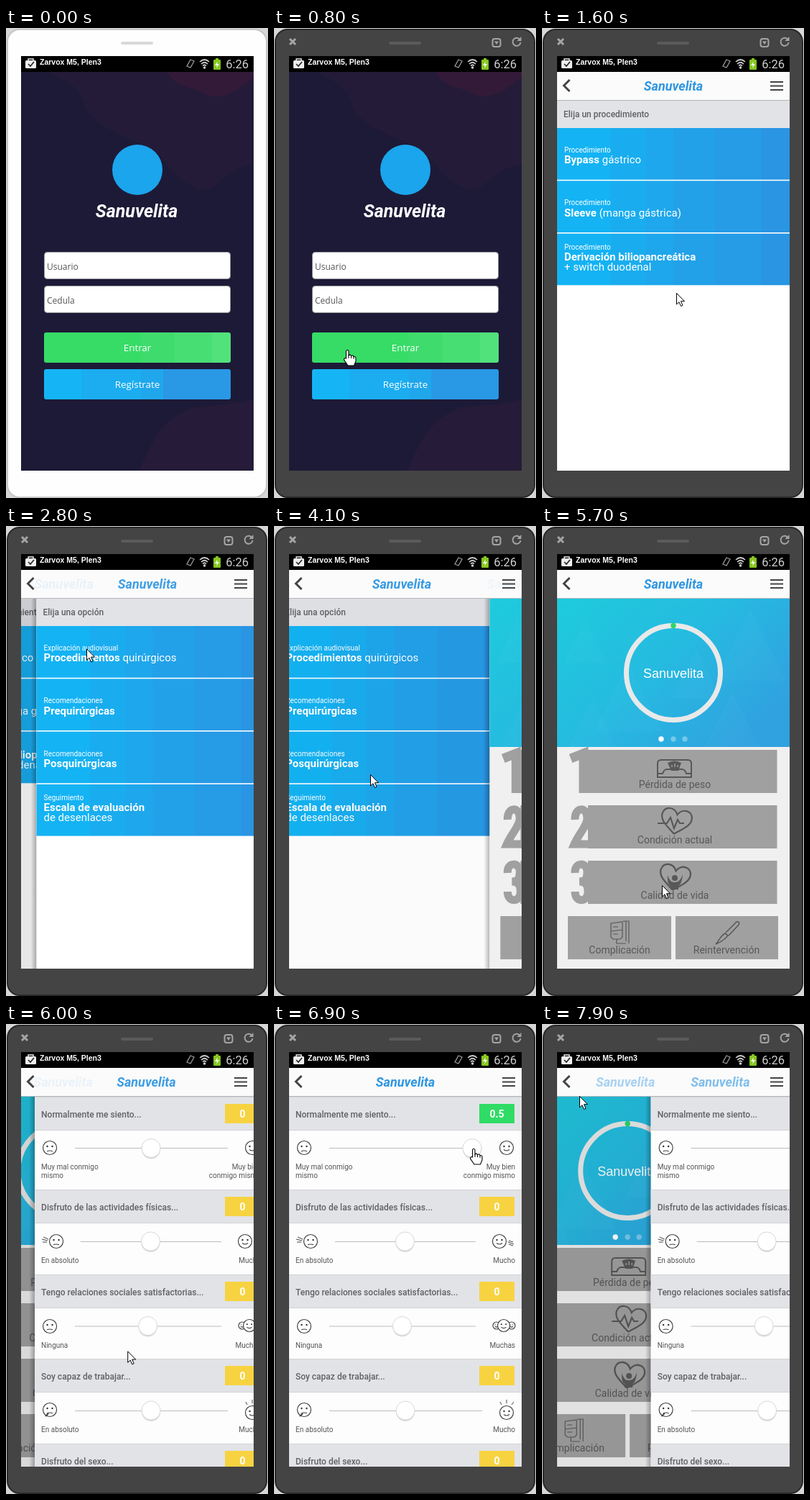
These frames come from a looping animation (365 px wide and 653 px high, 8 s). An HTML page:

```html
<!DOCTYPE html>
<html lang="es">
<head>
<meta charset="utf-8">
<title>Sanuvelita</title>
<style>
  html, body { margin: 0; width: 100%; height: 100%; overflow: hidden; background: #d6d6d6; }
  svg { display: block; width: 365px; height: 653px; }
  text { font-family: Roboto, sans-serif; white-space: pre; }
</style>
</head>
<body>
<svg id="stage" viewBox="0 0 365 653"></svg>
<script>
const LOOP = 8000, WIDTH = 324, BRAND = 'Sanuvelita';

// Drawing helpers
const rect = (x, y, w, h, fill, extra = '') =>
  `<rect x="${x}" y="${y}" width="${w}" height="${h}" fill="${fill}" ${extra}/>`;
const circle = (x, y, r, fill, extra = '') =>
  `<circle cx="${x}" cy="${y}" r="${r}" fill="${fill}" ${extra}/>`;
const text = (x, y, size, fill, content, extra = '') =>
  `<text x="${x}" y="${y}" font-size="${size}" fill="${fill}" ${extra}>${content}</text>`;
const line = (d, color, width = 1, extra = '') =>
  `<path d="${d}" fill="none" stroke="${color}" stroke-width="${width}" ${extra}/>`;
const shape = (d, fill, extra = '') => `<path d="${d}" fill="${fill}" ${extra}/>`;
const group = (id, content, extra = '') => `<g id="${id}" ${extra}>${content}</g>`;
const MIDDLE = 'text-anchor="middle"', END = 'text-anchor="end"', BOLD = 'font-weight="700"';

// Horizontal gradient made of flat bands
const bands = (id, stops) => `<linearGradient id="${id}">` + stops.map(([at, color], i) =>
  `<stop offset="${at}" stop-color="${color}"/>` +
  `<stop offset="${i + 1 < stops.length ? stops[i + 1][0] : 1}" stop-color="${color}"/>`).join('') +
  '</linearGradient>';

const defs = `<defs>
  ${bands('itemBlue', [[0, '#14b3f3'], [.23, '#19adef'], [.38, '#1ea7ec'], [.5, '#22a1e9'], [.68, '#269be6'], [.88, '#2995e3']])}
  ${bands('buttonBlue', [[0, '#15b5f5'], [.2, '#1badf0'], [.52, '#20a6eb'], [.64, '#2998e5']])}
  ${bands('buttonGreen', [[0, '#37dc67'], [.52, '#3fdc6d'], [.7, '#47de74'], [.9, '#51e27c']])}
  <linearGradient id="aqua" x2="1" y2=".65"><stop stop-color="#1ecbdc"/><stop offset=".5" stop-color="#25bbe0"/><stop offset="1" stop-color="#30a2e0"/></linearGradient>
  <linearGradient id="shade"><stop stop-opacity="0"/><stop offset="1" stop-opacity=".28"/></linearGradient>
  <clipPath id="screen"><rect x="21" y="61" width="324" height="554"/></clipPath>
</defs>`;

function loginPage() {
  const field = (y, label) => rect(53.5, y + .5, 259, 37, '#fff', 'rx="4" stroke="#9a9a9f"') +
    text(57, y + 25, 12, '#555', label, 'style="font-family:Open Sans,sans-serif"');
  const button = (y, fill, label) => rect(53, y, 260, 42, `url(#${fill})`, 'rx="3"') +
    text(183, y + 26, 13.4, '#fff', label, MIDDLE + ' style="font-family:Open Sans,sans-serif"');
  return rect(21, 61, WIDTH, 554, '#1d1a37') +
    shape('M60 61C78 72 102 78 108 105C114 130 160 150 188 160C225 176 225 204 260 220C290 240 300 195 345 190V61Z', '#241b38') +
    shape('M225 61C238 85 262 81 276 91C300 103 325 85 345 68V61Z', '#331a39') +
    shape('M185 615C205 575 212 548 256 529C290 522 315 526 345 515V615Z', '#261b38') +
    circle(183, 197, 35, '#1ba5ec') +
    text(182, 263, 25, '#fff', BRAND, `${MIDDLE} ${BOLD} font-style="italic"`) +
    field(311, 'Usuario') + field(358, 'Cedula') +
    button(423, 'buttonGreen', 'Entrar') + button(474, 'buttonBlue', 'Regístrate');
}

function listPage(heading, items) {
  return rect(21, 101, WIDTH, 514, '#fff') + rect(21, 101, WIDTH, 38, '#e2e3e7') +
    text(30, 124, 12, '#5f6165', heading, 'font-weight="500"') +
    items.map(([label, main, rest, second], i) => {
      const y = 139 + i * 73.3, top = y + (second ? 22 : 34);
      return rect(21, y, WIDTH, 71.7, 'url(#itemBlue)') + text(31, top, 10, '#fff', label) +
        text(31, top + 15.3, 15, '#fff', `<tspan font-weight="700">${main}</tspan>${rest}`) +
        (second ? text(31, top + 29, 15, '#fff', second) : '');
    }).join('');
}

function dashboardPage() {
  const ink = '#585858', gray = '#a0a0a0';
  // Each numeral runs into the tile on its right
  const digits = line('M40 323L58 316V371', gray, 13) +
    line('M46 408C45 390 63 389 63 406C63 417 52 426 45 442H69', gray, 11) +
    line('M46 482C45 466 63 467 63 480C63 494 57 494 52 494C60 494 64 498 64 508C64 523 46 524 46 508', gray, 11);
  const tiles = [311, 388, 465].map(y => rect(64, y, 263.500, 60, gray)).join('') +
    rect(36, 542, 144, 60, gray) + rect(186, 542, 143, 60, gray);
  const label = (x, y, s) => text(x, y, 14, ink, s, MIDDLE);
  const heart = (x, y) => `M${x} ${y + 34}C${x - 8} ${y + 27} ${x - 22} ${y + 20} ${x - 21} ${y + 9}C${x - 19} ${y - 3} ${x - 5} ${y - 3} ${x} ${y + 7}C${x + 6} ${y - 4} ${x + 21} ${y - 2} ${x + 21} ${y + 10}C${x + 21} ${y + 20} ${x + 8} ${y + 27} ${x} ${y + 34}`;
  const triangles = [[60, 130, 60], [120, 190, 95], [215, 170, 70], [290, 115, 100], [70, 240, 67], [265, 230, 77]]
    .map(([x, y, s]) => shape(`M${x} ${y}l${s / 2} ${s}h${-s}Z`, '#fff', 'opacity=".02"')).join('');
  return rect(21, 101, WIDTH, 514, '#f0f0f0') + rect(21, 101, WIDTH, 206, 'url(#aqua)') + triangles +
    circle(183, 204, 65.5, 'none', 'stroke="#e9e9e9" stroke-width="7"') + circle(183, 138.5, 3.7, '#2fd566') +
    text(183, 211, 18, '#fff', BRAND, MIDDLE + ' style="font-family:Liberation Sans,sans-serif"') +
    [166, 183, 199].map((x, i) => circle(x, 296, 3.7, '#fff', i ? 'opacity=".35"' : '')).join('') +
    tiles + digits +
    line('M161 349V330Q161 325 166 325H203Q208 325 208 330V349ZM161 344H168Q170 338 174 338H195Q199 338 201 344H208', ink, 2) +
    shape('M175 329Q185 324 194 329L190 340H180Z', ink) + line('M181 335V332M185 335V330M189 335V332', gray, 1.5) +
    label(185, 364, 'Pérdida de peso') +
    line(heart(187, 394), ink, 2.2, 'transform="rotate(10 187 410)"') +
    line('M161 413H174L179 405L184 420L189 408L192 413H198', ink, 2.2) +
    label(185, 441, 'Condición actual') +
    line(heart(185, 472), ink, 2.4, 'transform="rotate(10 185 488)"') +
    circle(185, 489, 4, ink) + shape('M175 485Q178 496 185 495Q192 496 196 484Q195 497 190 500V505H179V500Q174 497 175 485', ink) +
    label(185, 518, 'Calidad de vida') +
    line('M96 552L112 550V571L109 574H99L96 571ZM96 563L112 561M113 549H121V580M117 549V577M104 574V580H117M99 557H106M99 567H106', ink, 1.2) +
    label(108, 594, 'Complicación') +
    line('M242 581C247 576 248 570 255 566L259 569C254 575 249 578 242 581ZM256 565L271 550Q276 549 274 554L260 569', ink, 1.5) +
    label(257, 594, 'Reintervención');
}

function face(x, y, mood, r = 9.5) {
  const s = r / 9.5;
  return circle(x, y, r, '#fff', 'stroke="#444" stroke-width="1.2"') +
    circle(x - 3.5 * s, y - 2 * s, 1.2 * s, '#333') + circle(x + 3.5 * s, y - 2 * s, 1.2 * s, '#333') +
    line(`M${x - 4 * s} ${y + 4 * s - mood}Q${x} ${y + 4 * s + mood} ${x + 4 * s} ${y + 4 * s - mood}`, '#444', 1.1);
}

function formPage() {
  const rows = [
    [101, 172, 'Normalmente me siento...', ['Muy mal conmigo', 'mismo'], ['Muy bien', 'conmigo mismo'], 77, 290,
      face(42, 172, -1) + face(324, 172, 1.5)],
    [230, 302, 'Disfruto de las actividades físicas...', ['En absoluto'], ['Mucho'], 85, 281,
      face(51, 302, -.6) + line('M31 299L39 301M33 296L40 299M32 303H38', '#444') + face(314, 302, 1.5) + line('M326 303L334 306M327 306L333 308M327 301L333 303', '#444')],
    [348, 419.5, 'Tengo relaciones sociales satisfactorias...', ['Ninguna'], ['Muchas'], 77, 281,
      face(42, 420, -.7) + face(310, 419, 1, 5) + face(331, 419, 1, 5) + face(320, 419, 1.5, 8.5)],
    [465, 537, 'Soy capaz de trabajar...', ['En absoluto'], ['Mucho'], 77, 290,
      face(42, 536, -.7) + line('M36 545L40 541', '#444', 2) + face(324, 540, 1.5) + line('M317 529L315 525M324 527V522M331 529L334 525', '#444')],
    [583, 655, 'Disfruto del sexo...', [], [], 77, 290, '']
  ];
  return rect(21, 101, WIDTH, 514, '#fdfdfd') +
    rows.map(([top, y, heading, left, right, from, to, faces], i) => {
      const caption = (lines, x, anchor) => lines.map((s, k) => text(x, y + 30 + 12 * k, 10, '#555', s, anchor)).join('');
      return rect(21, top, WIDTH, 47, '#e2e3e7') + line(`M21 ${top + .5}H345M21 ${top + 46.5}H345`, '#d2d3d6') +
        text(30, top + 28.5, 12, '#5f6165', heading, 'font-weight="500"') +
        rect(286, top + 10, 49, 27, '#f7d341', i ? '' : 'id="badge"') +
        text(310.5, top + 28.5, 14, '#fff', '0', `${MIDDLE} ${BOLD} ${i ? '' : 'id="score"'}`) +
        line(`M${from} ${y + .5}H${to}`, '#bcbcbc') + faces + caption(left, 30, '') + caption(right, 336, END) +
        group(i ? 'thumb' + i : 'thumb',
          circle(0, 2, 13, '#000', 'opacity=".13"') + circle(0, 0, 13, '#fff', 'stroke="#cfcfcf" stroke-width=".8"'),
          `transform="translate(${(from + to) / 2 - .5} ${y})"`);
    }).join('');
}

const pages = [
  loginPage(),
  listPage('Elija un procedimiento', [
    ['Procedimiento', 'Bypass', ' gástrico'],
    ['Procedimiento', 'Sleeve', ' (manga gástrica)'],
    ['Procedimiento', 'Derivación biliopancreática', '', '+ switch duodenal']]),
  listPage('Elija una opción', [
    ['Explicación audiovisual', 'Procedimientos', ' quirúrgicos'],
    ['Recomendaciones', 'Prequirúrgicas', ''],
    ['Recomendaciones', 'Posquirúrgicas', ''],
    ['Seguimiento', 'Escala de evaluación', '', 'de desenlaces']]),
  dashboardPage(),
  formPage()
];

const title = id => text(183, 87, 18, '#2e96e3', BRAND, `id="${id}" ${MIDDLE} ${BOLD} font-style="italic"`);
const header = rect(21, 61, WIDTH, 40, '#fbfbfb') + line('M21 100.5H345', '#b4b6b9') +
  title('underTitle') + title('overTitle') +
  line('M38.5 72L30.5 80L38.5 88', '#444', 3) + line('M318 75H336M318 80.5H336M318 86H336', '#444', 2);

const statusBar = rect(21, 39, WIDTH, 22, '#000') +
  rect(27, 45, 15, 11, '#eee', 'rx="1.5"') + line('M31 46V43H38V46', '#eee', 1.5) + line('M31 50L34 53L39 47', '#222', 1.6) +
  text(47, 51, 10.5, '#fff', 'Zarvox M5, Plen3', BOLD + ' style="font-family:Liberation Sans,sans-serif"') +
  line('M257 44L262 46L257 55L252 53Z', '#999', 1.3) +
  line('M270 47Q276.5 41 283 47M272 50Q276.5 45.5 281 50M274 52.5Q276.5 50 279 52.5', '#ccc', 1.7) + circle(276.5, 55, 1.8, '#ccc') +
  rect(289, 44, 10, 14, '#86c61f', 'rx="1"') + rect(292, 42, 4, 2, '#86c61f') + shape('M295 46L291 52H294L293 56L297 50H294Z', '#fff') +
  text(338, 56, 16.5, '#d0d0d0', '6:26', END);

const body = (fill, edge, speaker) => rect(2, 2, 361, 650, fill, `rx="17" stroke="${edge}" stroke-width="2"`) +
  rect(160, 19, 45, 4, speaker, 'rx="2"');
const darkBody = body('#444', '#292929', '#5b5b5b') +
  line('M22 15L30 23M30 15L22 23', '#a5a5a5', 3) +
  rect(304.5, 15, 11, 11, 'none', 'rx="3" stroke="#a5a5a5" stroke-width="2"') + shape('M307 18.5H313L310 23Z', '#a5a5a5') +
  line('M342 15.5A5.5 5.5 0 1 0 343.5 20', '#a5a5a5', 2) + shape('M344.5 12V18H338.5Z', '#a5a5a5');

const arrow = shape('M.5 .5V16L4 12.7L6.5 18.5L9 17.4L6.5 11.7H11.5Z', '#fff', 'stroke="#000"');
const hand = shape('M-1.5 12V2Q0 -1.5 2 2V8Q4 6 5.5 8.5Q8 7 9 9.5Q12 9 12 12V16L9.5 22H1L-4.5 14Q-4 10.5 -1.5 12Z', '#fff', 'stroke="#000" stroke-width="1.1"') +
  line('M2 8V12M5.5 9V12M9 10V13', '#000');

stage.innerHTML = defs + body('#fefefe', '#c6c6c6', '#d9d9d9') + group('dark', darkBody) + statusBar +
  `<g clip-path="url(#screen)">${rect(21, 61, WIDTH, 554, '#000')}` +
  pages.map((content, i) => group('page' + i, rect(13, 61, 8, 554, 'url(#shade)') + content)).join('') +
  group('header', header) + '</g>' + group('arrow', arrow) + group('hand', hand);

// Motion
const $ = id => document.getElementById(id);
const clamp = v => Math.min(1, Math.max(0, v));
const smooth = v => v * v * (3 - 2 * v);

// cubic-bezier(.36, .66, .04, 1)
function slideEase(x) {
  if (x <= 0 || x >= 1) return clamp(x);
  const curve = (s, a, b) => 3 * (1 - s) ** 2 * s * a + 3 * (1 - s) * s * s * b + s ** 3;
  let low = 0, high = 1;
  for (let i = 0; i < 24; i++) {
    const mid = (low + high) / 2;
    if (curve(mid, .36, .04) < x) low = mid; else high = mid;
  }
  return curve(low, .66, 1);
}

// start, page left, page entered
const slides = [[980, 0, 1], [2560, 1, 2], [4067, 2, 3], [5750, 3, 4], [7819, 4, 3]];

// time, x, y
const cursorPath = [
  [450, -20, 560], [800, 102, 447], [1050, 102, 447], [1600, 187, 368], [2100, 112, 171], [3300, 112, 170],
  [3850, 118, 388], [3980, 118, 388], [4100, 134, 345], [4800, 98, 471], [5050, 125, 551], [5200, 147, 537],
  [5350, 147, 537], [5500, 167, 499], [5850, 167, 499], [6500, 183, 173], [6580, 183, 173], [6850, 278, 173],
  [7050, 278, 173], [7420, 34, 93], [7650, 34, 93], [7900, 52, 100], [8000, 56, 103]];

function cursorAt(t) {
  const i = cursorPath.findIndex(key => key[0] > t);
  if (i < 1) return cursorPath[0].slice(1);
  const [t0, x0, y0] = cursorPath[i - 1], [t1, x1, y1] = cursorPath[i];
  const k = smooth((t - t0) / (t1 - t0));
  return [x0 + (x1 - x0) * k, y0 + (y1 - y0) * k];
}

function place(id, x, y, opacity = 1) {
  $(id).setAttribute('transform', `translate(${x} ${y})`);
  $(id).setAttribute('opacity', opacity);
}

function showPages(t) {
  const [start, from, to] = slides.findLast(s => t >= s[0]) || slides[0];
  const forward = to > from, under = Math.min(from, to), over = Math.max(from, to);
  const depth = lag => {
    const p = slideEase((t - start - lag) / 500);
    return forward ? p : 1 - p;
  };
  const q = depth(0), titleQ = depth(forward ? 22 : 0);
  pages.forEach((_, i) => $('page' + i).style.display = i === under || i === over ? '' : 'none');
  place('page' + under, -.33 * WIDTH * q, 0, 1 - .1 * q);
  place('page' + over, WIDTH * (1 - q), 0, q > 0 ? 1 : 0);
  place('underTitle', -112 * titleQ, 0, under ? 1 - titleQ : 0);
  place('overTitle', 162 * (1 - titleQ), 0, titleQ);
  $('header').style.display = t >= slides[0][0] ? '' : 'none';
}

function draw(t) {
  $('dark').setAttribute('opacity', clamp((t - 470) / 200));
  showPages(t);

  const drag = smooth(clamp((t - 6580) / 270)), value = Math.round(drag * 5) / 10;
  place('thumb', 183 + 93 * drag, 172.5);
  $('score').textContent = value;
  $('badge').setAttribute('fill', value ? '#30dc65' : '#f7d341');

  const [x, y] = cursorAt(t), pointing = (t > 700 && t < 1050) || (t > 6450 && t < 7100);
  place('arrow', x, y, pointing ? 0 : 1);
  place('hand', x, y, pointing ? 1 : 0);
}

const begin = performance.now();
function tick() {
  draw((performance.now() - begin) % LOOP);
  requestAnimationFrame(tick);
}
tick();
</script>
</body>
</html>
```
